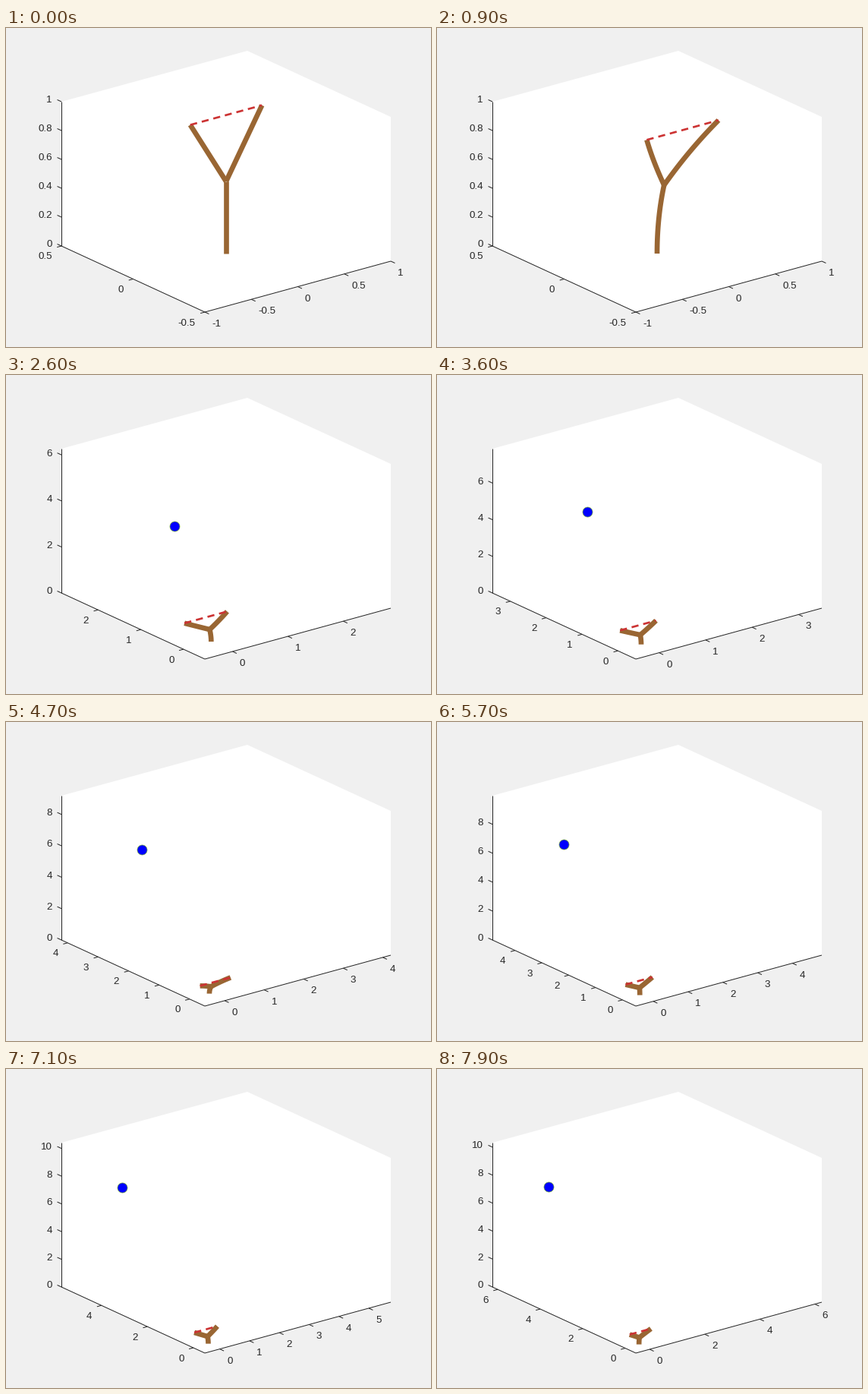
Animation, 560 px wide and 420 px high, one loop 8000 ms. Source, as a matplotlib script:

```python
import numpy as np
import matplotlib.pyplot as plt
from matplotlib.animation import FuncAnimation

W, H, DPI = 560, 420, 100
FRAMES, STEP_MS = 80, 100
PX = 72 / DPI                      # points per pixel

ORIGIN = np.array([262.0, 374.0])  # projected corner of the box
EX = np.array([245.0, -67.0])
EY = np.array([-189.0, -87.0])
EZ = np.array([0.0, -190.0])

INK, BROWN, RED = "#262626", "#996633", "#cc3333"
RELEASE = 10
STEM, ARM, SPREAD = 0.5, 0.6, np.radians(40)

plt.rcParams["font.family"] = "Liberation Sans"
fig = plt.figure(figsize=(W / DPI, H / DPI), dpi=DPI, facecolor="#f0f0f0")
ax = fig.add_axes([0, 0, 1, 1])


def unit(v):
    return v / np.hypot(*v)


def ball_at(k):
    """Ball distance along y and height, in flight."""
    n = k - RELEASE
    return -0.165 + 0.064 * n, 0.88 + 0.2432 * n - 0.001962 * n * n


def tip_shift(k):
    """Sideways shift of the fork tips: pulled back, then swinging."""
    if k < RELEASE:
        return -0.02 * k
    return 0.21 * np.cos(np.radians(24.15) * (k - 8.9))


def limits(k):
    if k < RELEASE:
        return (-1, 1), (-0.5, 0.5), (0, 1)
    y, z = ball_at(k)
    return (-0.5, y + 2), (-0.5, y + 2), (0, z + 2)


def projector(lims):
    def project(x, y, z):
        u, v, w = [(np.asarray(c, float) - lo) / (hi - lo)
                   for c, (lo, hi) in zip((x, y, z), lims)]
        return (ORIGIN[:, None] + np.outer(EX, u) + np.outer(EY, v)
                + np.outer(EZ, w))
    return project


def tick_step(span, length, gap_whole, gap_part):
    for step in (0.5, 1, 2, 5):
        gap = gap_part if step < 1 else gap_whole
        if length * step / span >= gap:
            return step
    return 10


def ticks(lim, step):
    first = np.ceil(lim[0] / step - 1e-6)
    last = np.floor(lim[1] / step + 1e-6)
    return np.arange(first, last + 1) * step


def line(p, q, color=INK, width=1.0):
    ax.plot([p[0], q[0]], [p[1], q[1]], color=color, lw=width * PX,
            solid_capstyle="butt")


def draw_axis(start, edge, lim, step, out, shift, align):
    line(start, start + edge)
    for value in ticks(lim, step):
        p = start + edge * (value - lim[0]) / (lim[1] - lim[0])
        line(p, p + 6 * unit(out))
        ax.text(p[0] + shift[0], p[1] + shift[1], f"{value + 0.0:g}",
                ha=align, va="baseline", color=INK, fontsize=13.33 * PX)


def draw_box(k, lims):
    corners = [ORIGIN, ORIGIN + EX, ORIGIN + EX + EZ, ORIGIN + EX + EY + EZ,
               ORIGIN + EY + EZ, ORIGIN + EY]
    ax.fill(*np.transpose(corners), color="white", lw=0)
    if k < RELEASE:
        steps = 0.5, 0.5, 0.2
    else:
        spans = [hi - lo for lo, hi in lims]
        steps = (tick_step(spans[0], 254, 38.2, 44.5),
                 tick_step(spans[1], 208, 38.2, 44.5),
                 tick_step(spans[2], 190, 34, 34))
    draw_axis(ORIGIN, EX, lims[0], steps[0], -EY, (9.4, 19), "left")
    draw_axis(ORIGIN, EY, lims[1], steps[1], -EX, (-12.3, 17.5), "right")
    draw_axis(ORIGIN + EY, EZ, lims[2], steps[2], EY, (-12.1, 1.5), "right")


def draw_fork(shift, project):
    height = STEM + ARM * np.cos(SPREAD)
    curve = 2 * shift / height ** 2 + 1e-9

    def bend(x, s):
        return project(x, (1 - np.cos(curve * s)) / curve,
                       np.sin(curve * s) / curve)

    t = np.linspace(0, 1, 20)
    reach = ARM * np.sin(SPREAD)
    parts = [bend(0 * t, STEM * t)]
    parts += [bend(side * reach * t, STEM + (height - STEM) * t)
              for side in (-1, 1)]
    for part in parts:
        ax.plot(*part, color=BROWN, lw=6.67 * PX, solid_capstyle="butt",
                solid_joinstyle="round")
    left, right = parts[1][:, -1], parts[2][:, -1]
    ax.plot(*np.transpose([left, right]), color=RED, lw=2.67 * PX,
            ls=(0, (3.5, 2.4)), dash_capstyle="butt")


def draw(k):
    ax.clear()
    ax.set_xlim(0, W)
    ax.set_ylim(H, 0)
    ax.axis("off")
    lims = limits(k)
    project = projector(lims)
    draw_box(k, lims)
    draw_fork(tip_shift(k), project)
    if k >= RELEASE:
        y, z = ball_at(k)
        ax.plot(*project([0], [y], [z]), "o", ms=13 * PX, mfc="#0000ff",
                mec="#77ac30", mew=0.67 * PX)
    return []


anim = FuncAnimation(fig, draw, frames=FRAMES, init_func=lambda: [],
                     interval=STEP_MS, repeat=True, repeat_delay=0)
plt.show()
```
